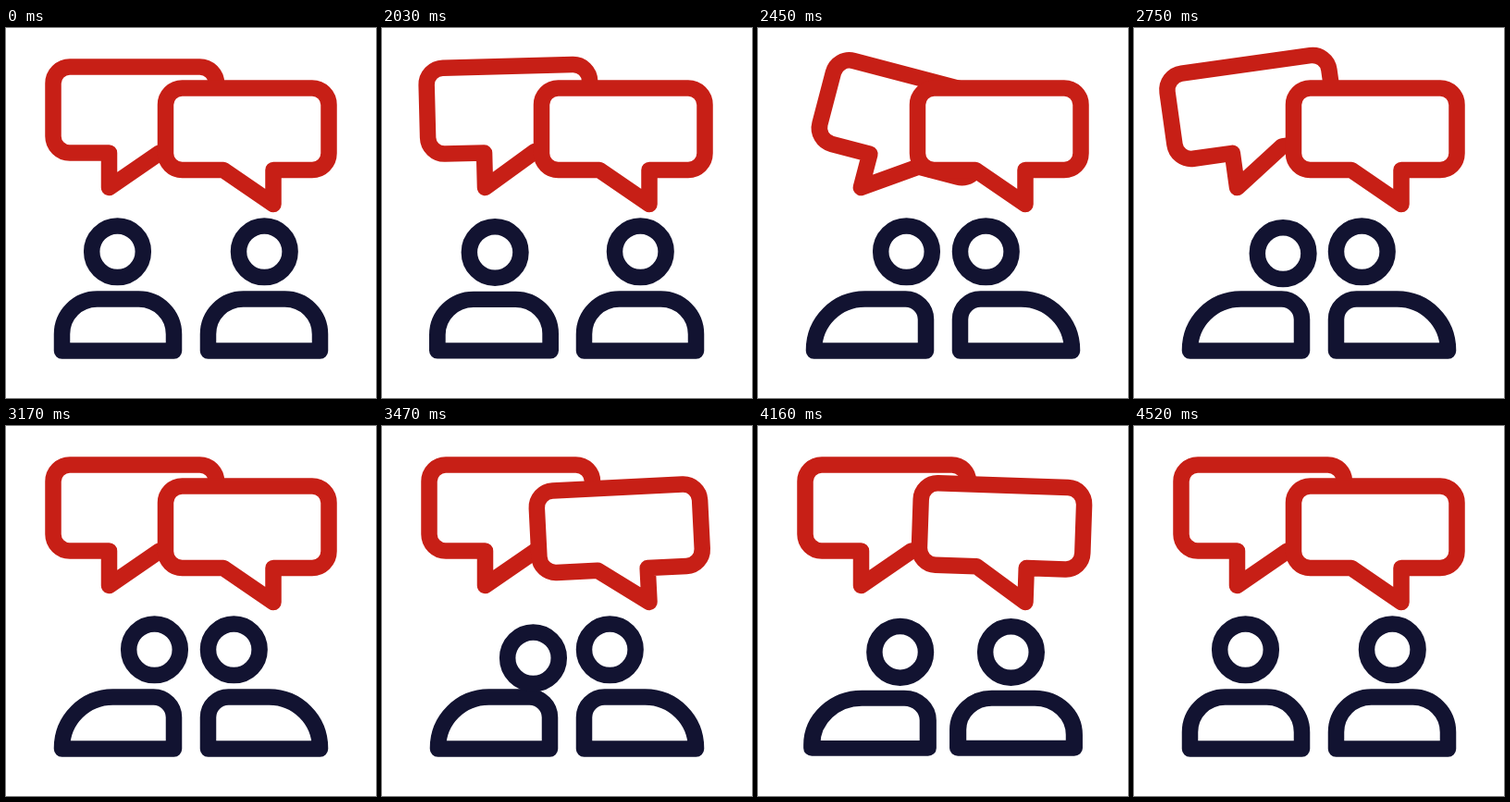
Write an HTML page that moves like this. It is 400 by 400 pixels and loops after 4.55 s.

```html
<!DOCTYPE html>
<html lang="en">
<head>
<meta charset="utf-8">
<title>Conversation</title>
<style>
  html, body { margin: 0; width: 100%; height: 100%; overflow: hidden; background: #fff; }
  svg { display: block; width: 100%; height: 100%; }
  svg * { stroke-width: 17.5; stroke-linejoin: round; }
  .bubble { fill: #fff; stroke: #c71f16; }
  .person { fill: none; stroke: #121331; }
</style>
</head>
<body>
<svg viewBox="0 0 400 400">
  <path id="bubbleL" class="bubble" d="M69 42H209.500a18 18 0 0 1 18 18V117a18 18 0 0 1-18 18H166L111.500 172.500V135H69a18 18 0 0 1-18-18V60a18 18 0 0 1 18-18Z"/>
  <path id="bubbleR" class="bubble" d="M190.500 65H331a18 18 0 0 1 18 18V135.500a18 18 0 0 1-18 18H289V190.500L235 153.500H190.500a18 18 0 0 1-18-18V83a18 18 0 0 1 18-18Z"/>
  <g class="person">
    <path id="bodyL"/><circle id="headL" r="27.800"/>
    <path id="bodyR"/><circle id="headR" r="27.800"/>
  </g>
</svg>
<script>
const LOOP = 4550, START = 2030, STEP = 30;
const $ = id => document.getElementById(id);
const clamp = v => Math.min(1, Math.max(0, v));
const ease = p => (1 - Math.cos(Math.PI * p)) / 2;
const progress = (t, from, to) => clamp((t - from) / (to - from));
const pulse = p => Math.sin(Math.PI * p) ** 2;
const nod = (t, mid, half) => pulse(progress(t, mid - half, mid + half));

// Eased interpolation through [time, value] keys
function track(t, keys) {
  let [t0, v0] = keys[0];
  for (const [t1, v1] of keys) {
    if (t < t1) return v0 + (v1 - v0) * ease(progress(t, t0, t1));
    [t0, v0] = [t1, v1];
  }
  return v0;
}

const swingL = [[2000, 0], [2172, -20], [2430, 15], [2710, -8.7], [2960, 3.2], [3170, 0]];
const swingR = [[3170, 0], [3350, -20], [3590, 14.3], [3880, -5.5], [4140, 2], [4340, 0]];

const people = [
  { side: 'L', x: 121, head: 120.5, shift: 40, lean: 1, out: [2000, 2230], back: [4030, 4510],
    nod: t => 9 * (nod(t, 2890, 200) + nod(t, 3470, 200)), drift: 0.33 },
  { side: 'R', x: 279, head: 279.3, shift: -33, lean: -1, out: [2090, 2380], back: [3820, 4290],
    nod: t => 12 * nod(t, 3900, 200), drift: 0 }
];

function drawPerson(p, t) {
  const out = progress(t, ...p.out), back = progress(t, ...p.back);
  const turn = ease(out) - ease(back);
  const squash = 4.6 * (pulse(out) + pulse(back));
  const dip = p.nod(t);

  const head = $('head' + p.side);
  head.setAttribute('cx', p.head + p.shift * turn + dip * p.drift);
  head.setAttribute('cy', 241.8 + squash + dip);

  // Outline around (0, 0), which lies 9 above the base line
  const wide = 38 + 17 * turn, tight = 38 - 16 * turn;
  const body = $('body' + p.side);
  body.setAttribute('d', `M-60.500 0V${-56 + wide}a${wide} ${wide} 0 0 1 ${wide} ${-wide}
    H${60.5 - tight}a${tight} ${tight} 0 0 1 ${tight} ${tight}V0Z`);
  body.setAttribute('transform',
    `translate(${p.x} ${349 - squash / 4}) scale(${p.lean * (1 + squash / 69)} ${1 - squash / 80})`);
}

function draw(now) {
  const time = now % LOOP;
  const t = time < START ? 0 : time - (time - START) % STEP;
  $('bubbleL').setAttribute('transform', `rotate(${track(t, swingL)} 111.500 172)`);
  $('bubbleR').setAttribute('transform', `rotate(${track(t, swingR)} 289 190)`);
  people.forEach(p => drawPerson(p, t));
}

const begin = performance.now();
function frame() {
  draw(performance.now() - begin);
  requestAnimationFrame(frame);
}
frame();
</script>
</body>
</html>
```
